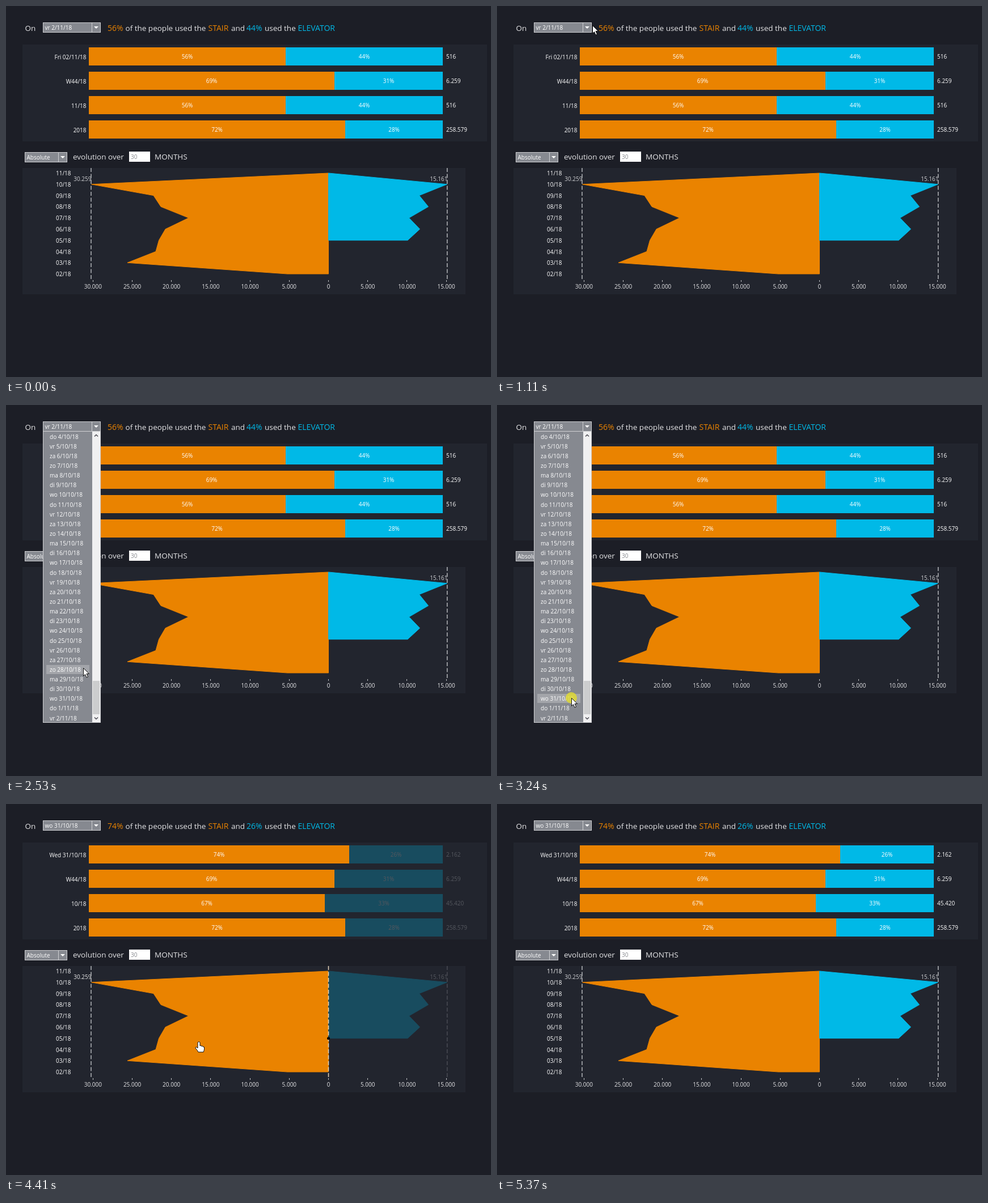
Animation, 855 px wide and 655 px high, one loop 5430 ms. Source, as an HTML page with a canvas:

```html
<!DOCTYPE html>
<html lang="en">
<head>
<meta charset="utf-8">
<title>Stair or elevator</title>
<style>
  html, body { margin: 0; width: 100%; height: 100%; overflow: hidden; background: #1c1e26; }
  canvas { display: block; }
</style>
</head>
<body>
<canvas id="stage" width="855" height="655"></canvas>
<script>
const ctx = document.getElementById('stage').getContext('2d');
ctx.lineJoin = 'round';
const LOOP = 5430;
const ORANGE = '#ea8300', BLUE = '#00b9e7', DIM_BLUE = '#184c5f', DIM_TEXT = '#55585f';
const BACKGROUND = '#1c1e26', PANEL = '#22252e', CONTROL = '#868990', LIGHT = '#e4e4e6', BORDER = '#cfd0d3';

// Mirrored area chart: x positions of the outline, one per month row.
const ZERO = 568.5, TOP = 295, ROW = 19.78, UNIT = 69.2;
const rowY = i => TOP + i * ROW;

function areaPath(...edges) {
  const path = new Path2D();
  path.moveTo(ZERO, TOP);
  edges.forEach((x, i) => path.lineTo(x, rowY(i)));
  path.lineTo(ZERO, rowY(edges.length - 1));
  path.closePath();
  return path;
}
const stairArea = areaPath(ZERO, 150.5, 260, 273, 322, 281, 269.5, 264, 214, 496);
const elevatorArea = areaPath(ZERO, 777.5, 728.5, 744.5, 710.5, 729.5, 708);

// Stacked bars: name, stair share in percent, total.
const BAR_LEFT = 146, BAR_WIDTH = 624, BAR_HEIGHT = 32, BAR_PITCH = 43;
const week = ['W44/18', 69.4, '6.259'], year = ['2018', 72.4, '258.579'];
const friday = {
  option: 'vr 2/11/18',
  bars: [['Fri 02/11/18', 55.6, '516'], week, ['11/18', 55.6, '516'], year]
};
const wednesday = {
  option: 'wo 31/10/18',
  bars: [['Wed 31/10/18', 73.6, '2.162'], week, ['10/18', 66.6, '45.420'], year]
};

const weekdays = ['zo', 'ma', 'di', 'wo', 'do', 'vr', 'za'];
const options = Array.from({ length: 30 }, (_, i) => {
  const date = new Date(2018, 9, 4 + i);
  return `${weekdays[date.getDay()]} ${date.getDate()}/${date.getMonth() + 1}/18`;
});
const OPTION_TOP = 47.4, OPTION_HEIGHT = 17.14;

// Each stroke moves the pointer in a fixed number of visible steps.
const strokes = [
  { start: 200, end: 740, steps: 8, from: [308, 613], to: [186, 32] },
  { start: 810, end: 1280, steps: 7, from: [186, 31], to: [159, 34] },
  { start: 1990, end: 2530, steps: 8, from: [156, 48], to: [136, 464] },
  { start: 2610, end: 2940, steps: 5, from: [134, 476], to: [131, 517] },
  { start: 3870, end: 4410, steps: 8, from: [136, 516], to: [340, 419] },
  { start: 4490, end: 4660, steps: 3, from: [342, 530], to: [348, 640] }
];

const easeOut = k => 1 - (1 - k) ** 2.4;

function pointerAt(t) {
  const stroke = strokes.findLast(s => t >= s.start);
  if (!stroke || t >= 4650) return null;
  const { start, end, steps, from, to } = stroke;
  const interval = (end - start) / (steps - 1);
  const k = Math.min(1, Math.floor((t - start + 20) / interval) / (steps - 1));
  return {
    x: Math.round(from[0] + (to[0] - from[0]) * k),
    y: Math.round(from[1] + (to[1] - from[1]) * easeOut(k))
  };
}

function box(x, y, w, h, color) {
  ctx.fillStyle = color;
  ctx.fillRect(x, y, w, h);
}

function label(text, x, middle, { color = '#fff', align = 'left', size = 10 } = {}) {
  ctx.font = `${size}px "Open Sans", "Noto Sans", sans-serif`;
  ctx.fillStyle = color;
  ctx.textAlign = align;
  ctx.fillText(text, x, Math.round(middle + size * 0.36));
}

const heading = (text, x, y, color = LIGHT) => label(text, x, y, { color, size: 13.5 });
const keyword = (text, x, y, color) => label(text, x, y, { color, size: 14 });

function shape(path, x, y, fill, stroke) {
  ctx.save();
  ctx.translate(x, y);
  ctx.fillStyle = fill;
  ctx.fill(path);
  if (stroke) {
    ctx.strokeStyle = stroke;
    ctx.lineWidth = 1;
    ctx.stroke(path);
  }
  ctx.restore();
}

function dot(x, y, radius, color) {
  ctx.fillStyle = color;
  ctx.beginPath();
  ctx.arc(x, y, radius, 0, Math.PI * 2);
  ctx.fill();
}

function dashedLine(x, color) {
  ctx.strokeStyle = color;
  ctx.lineWidth = 1.5;
  ctx.setLineDash([7, 3.5]);
  ctx.beginPath();
  ctx.moveTo(x, 286);
  ctx.lineTo(x, 484);
  ctx.stroke();
  ctx.setLineDash([]);
}

const triangle = new Path2D('M-4-2H4L0 2Z');
function dropdown(x, y, w, text) {
  box(x, y, w, 18, BORDER);
  box(x + 1, y + 1, w - 2, 16, CONTROL);
  box(x + w - 16, y + 1, 1, 16, BORDER);
  label(text, x + 3.5, y + 9.5);
  shape(triangle, x + w - 8, y + 9, '#fff');
}

function drawHeader({ bars }, option) {
  const stair = Math.round(bars[0][1]);
  heading('On', 33.5, 39);
  dropdown(65, 29, 102, option);
  keyword(stair + '%', 179, 39, ORANGE);
  heading('of the people used the', 210.5, 39);
  keyword('STAIR', 356.5, 39, ORANGE);
  heading('and', 397, 39);
  keyword(100 - stair + '%', 424, 39, BLUE);
  heading('used the', 456, 39);
  keyword('ELEVATOR', 514.5, 39, BLUE);
}

function drawBars({ bars }, dim) {
  box(29, 68, 819, 171, PANEL);
  const color = dim ? DIM_TEXT : '#fff';
  const right = BAR_LEFT + BAR_WIDTH;
  bars.forEach(([name, share, total], i) => {
    const y = 73 + i * BAR_PITCH, middle = y + BAR_HEIGHT / 2;
    const stair = Math.round(share);
    const split = Math.round(BAR_LEFT + BAR_WIDTH * share / 100);
    label(name, 141.5, middle + 1, { align: 'right' });
    box(BAR_LEFT, y, BAR_WIDTH, BAR_HEIGHT, dim ? DIM_BLUE : BLUE);
    box(BAR_LEFT, y, split - BAR_LEFT, BAR_HEIGHT, ORANGE);
    label(stair + '%', (BAR_LEFT + split) / 2, middle, { align: 'center' });
    label(100 - stair + '%', (split + right) / 2, middle, { align: 'center', color });
    label(total, 776, middle, { color });
  });
}

function drawEvolution(dim) {
  dropdown(33, 258, 75, 'Absolute');
  heading('evolution over', 118, 266);
  box(217, 257, 37, 18, '#fff');
  label('30', 220, 266, { color: '#85878c' });
  heading('MONTHS', 262, 266);

  box(29, 286, 781, 223, PANEL);
  const elevatorColor = dim ? DIM_BLUE : BLUE;
  shape(stairArea, 0, 0, ORANGE, ORANGE);
  shape(elevatorArea, 0, 0, elevatorColor, elevatorColor);
  dashedLine(150, '#b4b6ba');
  dashedLine(777.75, dim ? '#484b53' : '#b4b6ba');
  if (dim) dashedLine(ZERO, '#e6d3b8');
  label('30.259', 150.5, 305, { align: 'right', color: dim ? '#e8e8e8' : BORDER });
  label('15.161', 778.5, 305, { align: 'right', color: dim ? DIM_TEXT : BORDER });

  for (let i = 0; i < 10; i++) {
    label(String(11 - i).padStart(2, '0') + '/18', 114.5, rowY(i) + 0.5, { align: 'right' });
  }
  for (let i = -6; i <= 3; i++) {
    const x = ZERO + i * UNIT;
    box(Math.round(x - 0.5), 484, 1, 3, '#c8c9cc');
    label(i ? Math.abs(i * 5) + '.000' : '0', x, 495.5, { align: 'center', color: LIGHT });
  }
}

function chevron(x, y, dir) {
  ctx.strokeStyle = '#505058';
  ctx.lineWidth = 1.6;
  ctx.beginPath();
  ctx.moveTo(x - 3, y - 1.5 * dir);
  ctx.lineTo(x, y + 1.5 * dir);
  ctx.lineTo(x + 3, y - 1.5 * dir);
  ctx.stroke();
}

function drawList(pointer) {
  box(65, 46, 102, 515, BORDER);
  box(66, 47, 86, 513, CONTROL);
  const onOptions = pointer.x < 152 && pointer.y > OPTION_TOP;
  const active = onOptions ? Math.floor((pointer.y - OPTION_TOP) / OPTION_HEIGHT) : options.length - 1;
  box(71, Math.round(OPTION_TOP + active * OPTION_HEIGHT), 76, 16, '#a3a5aa');
  options.forEach((text, i) => label(text, 77, OPTION_TOP + (i + 0.5) * OPTION_HEIGHT));
  box(152, 47, 14, 513, '#f0f0f1');
  box(153, 487, 12, 59, '#cccdce');
  chevron(159, 54, -1);
  chevron(159, 553, 1);
}

const arrow = new Path2D('M.5.5V14.5L3.5 11.5L6 17L8.5 16L6 10.5H10.5Z');
const hand = new Path2D('M-2 2Q0-1 2 2V8Q4 6 5 9Q7 7 8 10Q10 9 9.5 12V14Q9 17 8 19H-1Q-3 15-6 12Q-6 9-3 11L-2 12Z');

function drawPointer({ x, y }, clicking, hovering) {
  if (clicking) dot(x, y, 10, 'rgba(226,218,48,.82)');
  if (hovering) dot(ZERO, rowY(Math.round((y - TOP) / ROW)), 2.5, '#000');
  shape(hovering ? hand : arrow, x, y, '#fff', '#111');
}

function draw(t) {
  const within = (start, end) => t >= start && t < end;
  const pointer = pointerAt(t);
  const dim = within(350, 655) || within(4170, 4560);
  const listOpen = within(1585, 3310);
  const clicking = within(1440, 1585) || within(3240, 3310);
  const data = t < 3540 ? friday : wednesday;
  const option = t < 3470 ? friday.option : wednesday.option;

  box(0, 0, 855, 655, BACKGROUND);
  drawHeader(data, option);
  drawBars(data, dim);
  drawEvolution(dim);
  if (listOpen) drawList(pointer);
  if (pointer) {
    const hovering = !listOpen && ctx.isPointInPath(stairArea, pointer.x, pointer.y);
    drawPointer(pointer, clicking, hovering);
  }
}

const begin = performance.now();
function tick() {
  draw((performance.now() - begin) % LOOP);
  requestAnimationFrame(tick);
}
tick();
</script>
</body>
</html>
```
